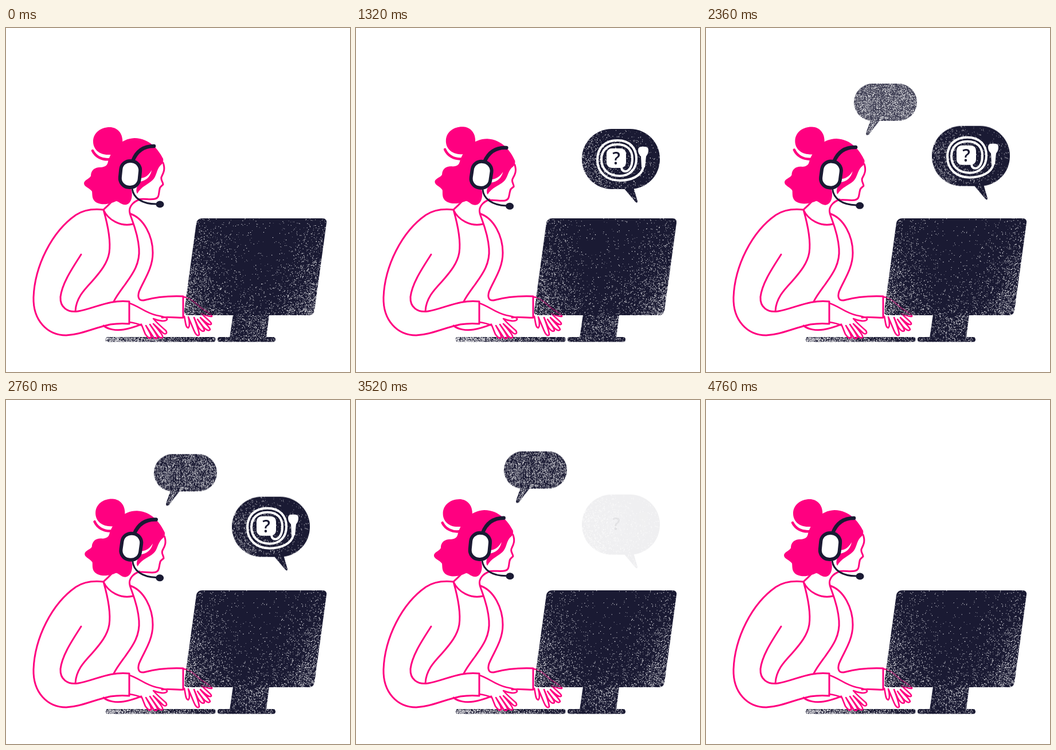
These frames come from a looping animation (600 by 600 pixels, 4800 ms). An HTML page with a canvas:

```html
<!DOCTYPE html>
<html lang="en">
<head>
<meta charset="utf-8">
<title>Support agent</title>
<style>
html, body { margin: 0; width: 100%; height: 100%; overflow: hidden; background: #fff; }
canvas { display: block; width: 600px; height: 600px; }
</style>
</head>
<body>
<canvas id="stage" width="600" height="600"></canvas>
<script>
const LOOP = 4800, GRAIN_STEP = 80, GRAIN_COUNT = 5;
const PINK = '#ff0080', NAVY = '#1a1a33', WHITE = '#fff';
const ctx = document.getElementById('stage').getContext('2d');
const clamp = v => Math.max(0, Math.min(1, v));
const ramp = (t, from, to) => clamp((t - from) / (to - from));

const shapes = {
  body: `M170 317 C152 315 136 317 122 326 C80 355 50 415 48 470 C47 510 72 536 105 536 C130 535 150 524 182 517 C195 515 205 515 215 516 V477
    C180 473 155 489 126 494 C107 497 94 487 95 469 C98 445 115 420 131 395
    M184 303 C180 308 174 313 170 317 C178 345 183 372 180 392 C177 410 165 425 150 442 C135 458 122 472 121 494
    M170 317 C178 335 200 347 221 342
    M233 299 C222 303 213 312 216 323 C218 332 230 355 232 385 C234 412 220 430 208 447 C200 458 193 467 188 477
    M217 324 C240 332 256 362 256 392 C256 420 240 440 232 460 C229 470 232 476 240 475 C262 469 285 467 309 468 V505 C296 506 284 503 272 505
    M170 519 C178 526 192 528 205 526 C218 524 228 520 236 517`,
  frontHand: `M215 480 C230 484 243 497 262 501 C272 503 282 505 281 508 C279 513 266 511 257 507
    C263 514 272 522 279 528 C282 533 278 535 274 532 L257 516
    C264 524 270 531 273 537 C274 542 269 541 266 538 L251 517
    C257 526 262 533 264 538 C264 543 259 542 257 539 L244 519
    C249 529 255 536 253 540 C250 543 246 538 243 534 L237 519 C228 515 222 514 215 513`,
  backHand: `M309 469 C322 470 330 480 340 488 C350 495 360 500 359 503 C354 504 346 500 341 498
    C347 505 356 511 358 515 C359 519 352 517 348 513 L339 505
    C345 513 355 521 356 526 C354 530 347 525 343 520 L334 508
    C339 516 346 523 346 528 C342 531 337 525 334 519 L328 505
    C332 516 337 529 337 535 C334 539 330 533 328 528 L318 504
    C320 512 321 520 318 523 C313 523 313 511 311 503 L309 505`,
  hair: `M178 233 C184 212 200 193 224 192 C250 192 266 212 274 228 C275 234 273 237 269 240 C262 248 263 258 256 265
    C248 273 236 276 229 289 C225 283 229 274 234 268 C245 266 252 259 254 248 C248 259 240 262 234 262 L218 280
    C222 292 219 306 210 308 C202 310 197 302 192 302 C184 306 170 310 159 305 C149 300 151 291 150 285
    C146 279 136 277 136 271 C136 265 146 263 148 258 C148 247 156 242 166 243 C174 242 177 239 178 233Z`,
  bun: 'M203 194 C205 210 194 222 178 221 C162 221 152 211 152 198 C152 183 165 173 181 173 C193 173 202 182 203 194Z',
  bunBand: 'M151 214 C156 224 167 231 182 229',
  face: `M274 235 C278 246 275 252 272 258 C268 264 274 268 274 273 C271 276 268 277 268 281
    C266 288 268 296 260 298 C252 300 240 297 232 299`,
  headband: 'M221 232 C226 219 236 206 258 206',
  micArm: 'M220 280 C222 297 238 307 262 307',
  monitor: 'M342 332 H552 Q560 332 559 340 L538 493 Q536 501 529 501 H318 Q310 501 311 493 L332 340 Q334 332 342 332Z',
  stand: 'M396 500 L390 541 H454 L459 500Z',
  cable: `M501 243 C498 258 480 266 460 266 C436 266 421 251 421 230 C421 208 435 196 456 196 C478 196 489 210 489 228
    C489 246 478 258 460 258 C440 258 428 246 428 229 C428 212 440 203 456 203 C474 203 482 214 482 228
    C482 242 476 250 470 250 C462 250 464 243 462 240`,
  plug: 'M492 213 Q492 207 498 207 H504 Q510 207 510 213 Q510 219 506 224 L504 243 H498 L497 224 Q492 219 492 213Z',
  questionTail: 'M466 278 L487 303 Q491 307 491 302 L484 278Z',
  answerTail: 'M288 158 L279 183 Q279 189 284 186 L304 160Z'
};
for (const name in shapes) shapes[name] = new Path2D(shapes[name]);

function pill(x, y, w, h, r) {
  const path = new Path2D();
  path.roundRect(x, y, w, h, r);
  return path;
}

function fill(c, path, color) {
  c.fillStyle = color;
  c.fill(path);
}

function stroke(c, path, color, width) {
  c.strokeStyle = color;
  c.lineWidth = width;
  c.lineCap = c.lineJoin = 'round';
  c.stroke(path);
}

// Seeded mulberry32 generator.
function randomizer(seed) {
  return () => {
    seed = (seed + 0x6D2B79F5) | 0;
    let r = Math.imul(seed ^ (seed >>> 15), seed | 1);
    r ^= r + Math.imul(r ^ (r >>> 7), r | 61);
    return ((r ^ (r >>> 14)) >>> 0) / 4294967296;
  };
}

// Paints navy shapes on their own layer, then sprays white specks inside them.
function grainLayer(seed, paths, sprays) {
  const canvas = document.createElement('canvas');
  canvas.width = canvas.height = 600;
  const c = canvas.getContext('2d'), random = randomizer(seed);
  for (const path of paths) fill(c, path, NAVY);
  c.globalCompositeOperation = 'source-atop';
  c.fillStyle = WHITE;
  for (const [x, y, w, h, tries, density] of sprays) {
    for (let i = 0; i < tries; i++) {
      const u = random(), v = random(), size = 0.5 + 0.7 * random();
      if (random() < density(u, v)) c.fillRect(x + u * w, y + v * h, size, size);
    }
  }
  return canvas;
}

// Specks gather along the slanted sides and in the lower corners.
function monitorGrain(u, v) {
  const side = Math.abs(2 * (u - 0.09 * (1 - v)) / 0.91 - 1);
  return 0.015 + 0.07 * side ** 3 + 0.42 * side ** 2.5 * v ** 1.6 + 0.07 * v ** 4;
}
const questionGrain = (u, v) => 0.03 + 0.45 * clamp(0.6 - u) ** 1.3 * (0.4 + v) + 0.04 * v;

const layers = Array.from({ length: GRAIN_COUNT }, (_, i) => {
  const seed = 7919 * (i + 1);
  return {
    desk: grainLayer(seed,
      [shapes.monitor, shapes.stand, pill(369, 539, 101, 8.5, 4), pill(173.5, 539, 192, 8.5, 4)],
      [[311, 332, 248, 169, 36000, monitorGrain],
       [389, 501, 71, 38, 2600, (u, v) => 0.1 + 0.16 * u],
       [369, 539, 101, 9, 800, () => 0.18],
       [173, 539, 193, 9, 2400, u => 0.12 + 0.7 * (1 - u) ** 1.6]]),
    question: grainLayer(seed + 1,
      [pill(394, 176, 136, 105, 52), shapes.questionTail],
      [[394, 176, 136, 130, 16000, questionGrain]]),
    answer: grainLayer(seed + 2,
      [pill(258, 97, 110, 65, 32.5), shapes.answerTail],
      [[258, 97, 110, 91, 12000, (u, v) => 0.28 + 0.08 * v]])
  };
});

function headAngle(t) {
  if (t < 680 || t > 4440) return 0;
  if (t < 3240) return 1.35 * (1 - Math.cos((t - 680) / 640 * Math.PI));
  return -0.3 * Math.sin((t - 3240) / 1200 * Math.PI);
}

function drawHead(angle) {
  ctx.save();
  ctx.translate(198, 300);
  ctx.rotate(angle * Math.PI / 180);
  ctx.translate(-198, -300);
  stroke(ctx, shapes.face, PINK, 3);
  fill(ctx, shapes.hair, PINK);
  fill(ctx, shapes.bun, PINK);
  stroke(ctx, shapes.bunBand, PINK, 4.5);
  stroke(ctx, shapes.headband, NAVY, 6.5);
  stroke(ctx, shapes.micArm, NAVY, 3);
  const mic = new Path2D();
  mic.ellipse(268.5, 307.5, 7, 6, 0, 0, 7);
  fill(ctx, mic, NAVY);
  ctx.translate(216.5, 255);
  ctx.rotate(0.1);
  const cup = pill(-17, -23, 34, 46, 16);
  fill(ctx, cup, WHITE);
  stroke(ctx, cup, NAVY, 6);
  ctx.restore();
}

function drawQuestion(t, layer) {
  if (t <= 520 || t >= 3560) return;
  const scale = 1 - (1 - ramp(t, 520, 1000)) ** 1.4;
  ctx.save();
  ctx.globalAlpha = 1 - ramp(t, 2980, 3560);
  ctx.translate(484, 296);
  ctx.scale(scale, scale);
  ctx.translate(-484, -296 - 0.0051 * (t - 1320));
  ctx.drawImage(layer, 0, 0);
  stroke(ctx, shapes.cable, WHITE, 4);
  fill(ctx, shapes.plug, WHITE);
  fill(ctx, pill(437, 210, 34, 34, 9), WHITE);
  ctx.fillStyle = NAVY;
  ctx.font = '600 30px "Open Sans", sans-serif';
  ctx.textAlign = 'center';
  ctx.fillText('?', 454, 238);
  ctx.restore();
}

function drawAnswer(t, layer) {
  ctx.save();
  ctx.globalAlpha = ramp(t, 1900, 2460) * (1 - ramp(t, 3800, 4380));
  ctx.drawImage(layer, 0, -0.0064 * (t - 2360));
  ctx.restore();
}

function draw(t) {
  const layer = layers[Math.floor(t / GRAIN_STEP) % GRAIN_COUNT];
  ctx.fillStyle = WHITE;
  ctx.fillRect(0, 0, 600, 600);
  stroke(ctx, shapes.body, PINK, 3);
  stroke(ctx, shapes.backHand, PINK, 2.6);
  ctx.drawImage(layer.desk, 0, 0);

  // The far hand shows faintly through the screen.
  ctx.save();
  ctx.clip(shapes.monitor);
  ctx.globalAlpha = 0.35;
  stroke(ctx, shapes.backHand, PINK, 2.6);
  ctx.restore();

  stroke(ctx, shapes.frontHand, PINK, 2.6);
  drawHead(headAngle(t));
  drawQuestion(t, layer.question);
  drawAnswer(t, layer.answer);
}

const start = performance.now();
function tick() {
  draw((performance.now() - start) % LOOP);
  requestAnimationFrame(tick);
}
tick();
</script>
</body>
</html>
```
